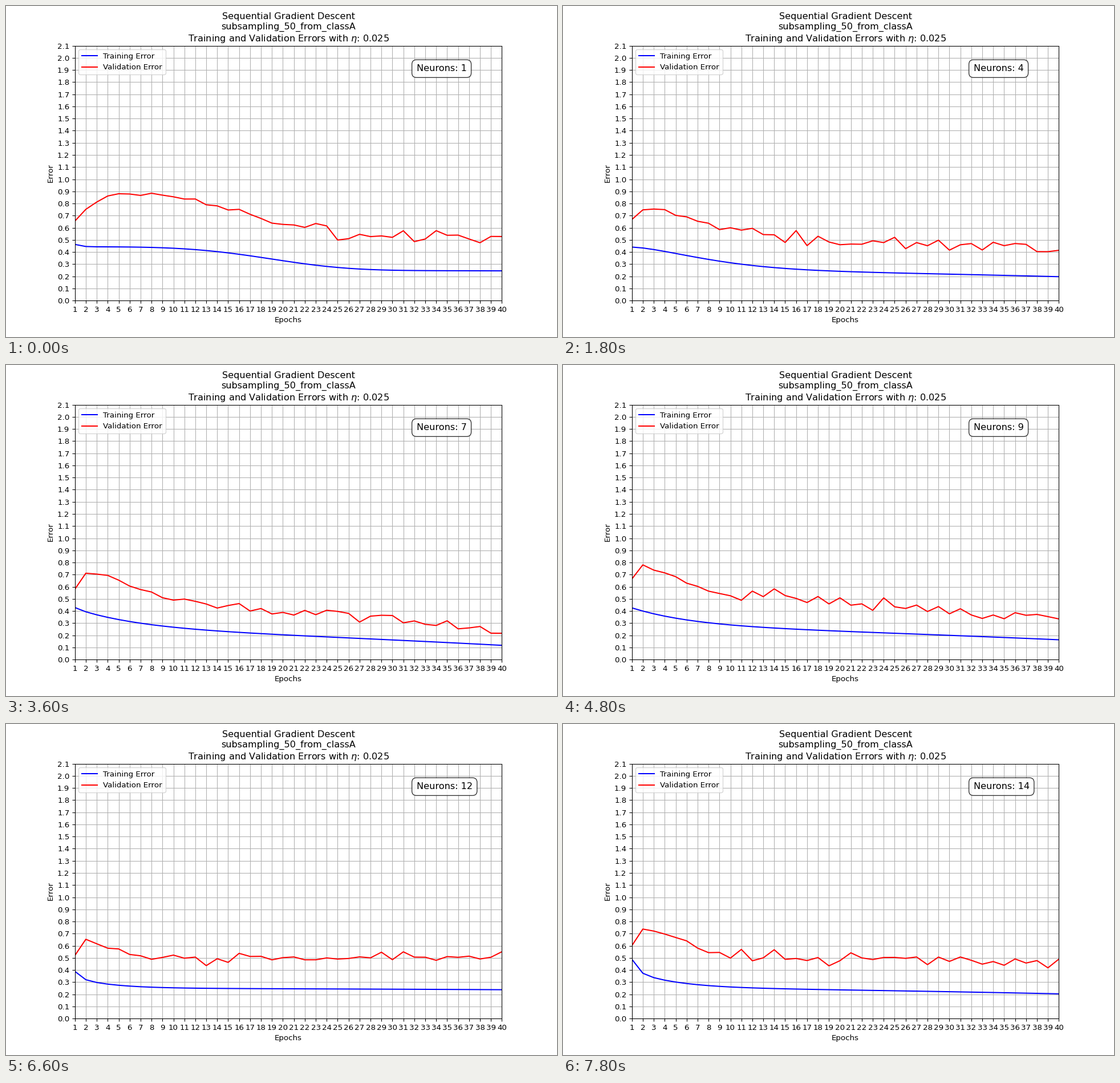
Recreate the animation shown at these times as a matplotlib script. Size 966 by 580 pixels, loop 8 s.

```python
import numpy as np
import matplotlib.pyplot as plt
from matplotlib.animation import FuncAnimation

DPI = 96.6
STEP_MS = 200
STEPS_PER_RUN = 3
RUNS = 14
FRAMES = 40

epochs = np.arange(1, 41)
t = epochs - 1
val_knots = [1, 2, 4, 8, 13, 20, 30, 40]
trends = {}


def fit(neurons, val, base, drop, amp, tau, power=1, kick=0):
    """Training error: late slope, main decay and first-epoch kick.
    Validation error: a trend through a few key points."""
    train = (base - drop * (t / 39) ** 1.6
             + amp * np.exp(-(t / tau) ** power)
             + kick * np.exp(-2 * t))
    trends[neurons] = train, np.interp(epochs, val_knots, val)


def blend(neurons, low, high, final):
    """Mix two runs, bending the training error to end at `final`."""
    w = (neurons - low) / (high - low)
    train, val = ((1 - w) * a + w * b for a, b in zip(trends[low], trends[high]))
    drift = (final - train[-1]) * t / 39
    trends[neurons] = train + drift, val + 2.3 * drift


def jitter(neurons):
    """Epoch-to-epoch noise that grows in as training settles."""
    noise = np.random.default_rng(neurons).normal(0, 0.028, len(t))
    return noise * np.clip(t / 12, 0, 1)


fit(1, [.655, .75, .871, .875, .81, .635, .515, .525],
    base=.25, drop=.005, amp=.193, tau=19.7, power=3.6, kick=.02)
fit(4, [.668, .748, .745, .635, .535, .485, .475, .42],
    base=.251, drop=.054, amp=.19, tau=8.66, power=1.5)
fit(7, [.58, .711, .70, .535, .455, .425, .36, .22],
    base=.23, drop=.113, amp=.19, tau=6.5, kick=.009)
fit(9, [.664, .78, .71, .56, .52, .465, .41, .345],
    base=.257, drop=.094, amp=.169, tau=6)
fit(10, [.566, .723, .71, .54, .475, .465, .42, .28],
    base=.25, drop=.103, amp=.155, tau=5.3, kick=.016)
fit(12, [.52, .651, .575, .51, .49, .485, .53, .50],
    base=.249, drop=.011, amp=.087, tau=3.3, kick=.053)
fit(14, [.601, .74, .717, .535, .49, .495, .49, .445],
    base=.25, drop=.046, amp=.142, tau=4, kick=.097)

blend(2, 1, 4, final=.243)
blend(3, 1, 4, final=.240)
blend(5, 4, 7, final=.240)
blend(6, 4, 7, final=.240)
blend(8, 7, 9, final=.190)
blend(11, 10, 12, final=.197)
blend(13, 12, 14, final=.143)

curves = {n: (trends[n][0], trends[n][1] + jitter(n)) for n in range(1, RUNS + 1)}

fig, ax = plt.subplots(figsize=(10, 580 / DPI), dpi=DPI)
train_line, = ax.plot(epochs, curves[1][0], color="blue", label="Training Error")
val_line, = ax.plot(epochs, curves[1][1], color="red", label="Validation Error")

ax.set_title("Sequential Gradient Descent\n"
             "subsampling_50_from_classA\n"
             r"Training and Validation Errors with $\eta$: 0.025")
ax.set_xlabel("Epochs")
ax.set_ylabel("Error")
ax.set_xlim(1, 40)
ax.set_ylim(0, 2.1)
ax.set_xticks(epochs)
ax.set_yticks(np.arange(22) / 10)
ax.grid(True)
ax.legend(loc="upper left")
counter = ax.text(0.8, 0.9, "Neurons: 1", transform=ax.transAxes, fontsize=12,
                  bbox=dict(boxstyle="round,pad=0.5", facecolor="white", alpha=0.8))


def update(frame):
    neurons = frame // STEPS_PER_RUN + 1
    train, val = curves[neurons]
    train_line.set_ydata(train)
    val_line.set_ydata(val)
    counter.set_text(f"Neurons: {neurons}")
    return train_line, val_line, counter


anim = FuncAnimation(fig, update, frames=FRAMES, interval=STEP_MS,
                     repeat=True, repeat_delay=0, blit=False)
plt.show()
```
